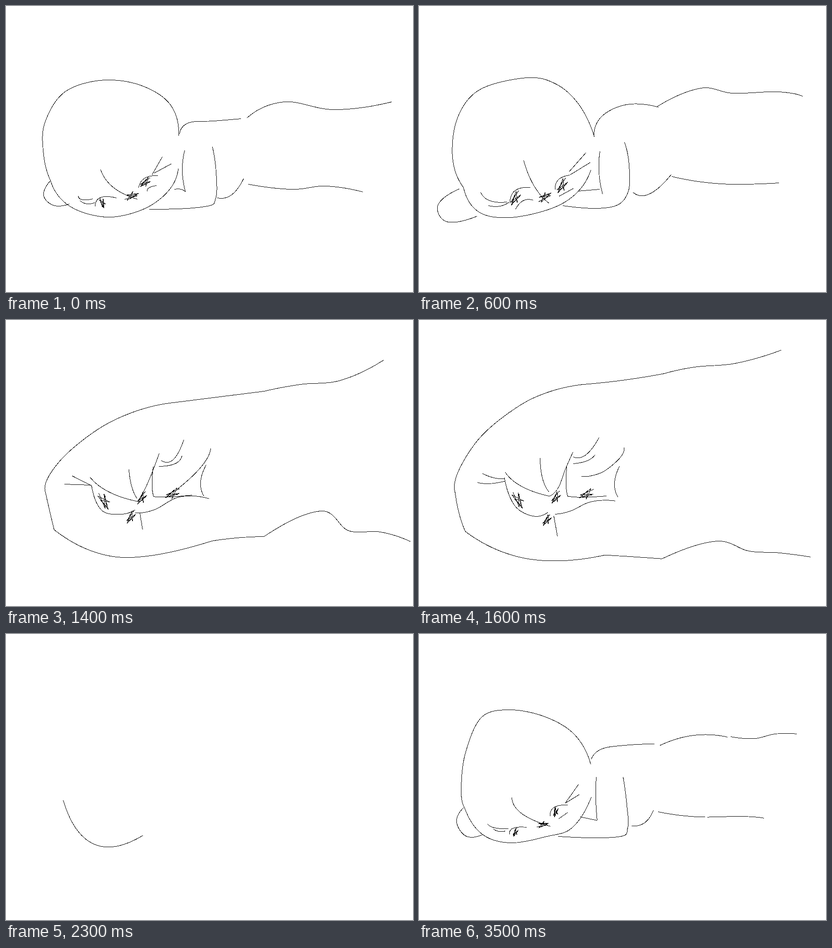
An HTML page that plays this animation: 892x628 px, repeating every 3.6 s.

```html
<!DOCTYPE html>
<html lang="en">
<head>
<meta charset="utf-8">
<title>Line drawing</title>
<style>
html, body { margin: 0; width: 100%; height: 100%; overflow: hidden; background: #fff; }
svg { display: block; }
path { fill: none; stroke: #000; stroke-width: 1; shape-rendering: crispEdges; }
</style>
</head>
<body>
<svg width="892" height="628" viewBox="0 0 892 628"><path id="ink"/></svg>
<script>
const STEP = 100, STEPS = 36, SAMPLES = 64;

// Each pose holds named strokes: a few points on a curve, or the axis of a scribble.
const resting = {
  head: '378 285 358 214 290 172 205 163 126 190 84 258 82 326 97 383',
  chin: '97 383 139 439 220 463 300 446 355 406 377 357',
  shoulder: '380 281 400 256 455 252 515 247',
  back: '528 245 610 210 718 227 845 210',
  hand: '97 383 82 415 103 437 139 434',
  armIn: '391 317 386 362 393 408',
  wrist: '393 408 383 402 369 402',
  armOut: '452 309 460 365 459 422 435 440 313 446',
  waist: '463 421 494 414 520 379',
  belly: '531 391 627 402 700 395 782 408',
  nose: '207 359 235 398 288 424',
  browR: '342 331 319 371',
  foldR: '362 346 325 366',
  browL: '158 417 167 425 190 423',
  foldL: '162 427 177 434 195 431',
  lidL: '195 439 207 420 242 421',
  lidR: '290 399 303 378 332 372',
  lowR: '309 406 314 398 330 394',
  irisL: '206 421 216 443',
  irisR: '316 376 295 398',
  tip: '260 424 289 409'
};

const lifting = {
  head: '384 287 350 216 300 171 236 157 133 183 84 245 73 332 97 398',
  chin: '97 398 131 452 200 464 290 444 345 410 376 360',
  shoulder: '383 287 400 242 455 216 525 222',
  back: '522 220 617 180 687 191 785 188 841 198',
  hand: '88 401 41 437 60 473 127 461',
  armIn: '396 319 394 365 402 413',
  wrist: '396 402 348 406',
  armOut: '450 299 460 350 457 410 420 441 315 438',
  waist: '469 409 505 412 552 370',
  belly: '554 374 620 386 690 391 789 388',
  nose: '229 339 252 395 285 433',
  browR: '365 322 328 364',
  foldR: '375 343 331 370',
  browL: '135 409 155 427 193 430',
  foldL: '152 438 177 439 197 430',
  lidL: '199 432 210 405 244 398',
  lidR: '298 403 305 381 330 371',
  lowL: '211 446 228 427 250 426',
  lowR: '307 417 338 400',
  irisL: '218 405 204 438',
  irisR: '321 377 306 411',
  tip: '262 429 288 408'
};

const merging = {
  head: '353 235 290 202 216 181 141 216 96 306 85 388',
  shoulder: '353 235 395 232 455 201 580 188',
  back: '580 188 770 179 844 182',
  hand: '85 388 64 455 97 488 165 463',
  chin: '165 463 265 467 345 452 430 426',
  waist: '430 426 503 413 575 396',
  belly: '575 396 660 398 755 379 800 400 879 398',
  cheek: '114 430 130 453 165 463',
  nose: '250 333 257 392 288 430',
  browR: '378 305 356 335 325 350',
  foldR: '371 338 352 345 329 347',
  browL: '144 366 165 379 192 387',
  foldL: '139 391 192 390',
  lidL: '190 380 223 397 258 403',
  lowL: '193 396 208 425 247 417',
  lidR: '325 336 300 376 302 409',
  lowR: '304 421 318 401 348 391',
  lip: '411 329 363 406',
  crease: '404 323 404 362 415 381',
  jaw: '373 411 380 394 422 386',
  irisL: '200 408 229 400',
  irisR: '308 370 300 402',
  irisLip: '390 369 377 392',
  tip: '262 431 280 406'
};

const stretching = {
  head: '350 183 275 203 205 237 134 292 93 343 86 378',
  shoulder: '350 183 565 156',
  back: '565 156 645 141 733 132 828 87',
  hand: '86 378 95 418 105 460',
  chin: '105 460 200 511 300 519 450 485',
  waist: '450 485 505 478 565 475',
  belly: '565 475 690 419 750 462 820 465 886 486',
  nose: '269 328 275 365 287 392',
  browR: '389 263 366 306 340 308',
  foldR: '385 298 370 315 334 321',
  browL: '145 342 186 363',
  foldL: '127 360 186 362',
  lidL: '184 345 225 377 288 398',
  lidR: '335 293 309 360 288 398',
  lowL: '187 363 209 417 250 426 283 416',
  lowR: '283 423 325 416 380 388 445 392',
  lip: '448 282 428 321 375 371',
  crease: '438 318 426 355 433 386',
  jaw: '322 322 321 378 335 388 408 384',
  irisL: '203 380 226 414',
  irisR: '305 376 290 405',
  irisLip: '380 370 350 392',
  tip: '280 418 267 447',
  groove: '293 424 299 460'
};

const looming = {
  head: '372 77 298 95 235 128 141 203 74 309 62 380',
  shoulder: '372 77 435 69 500 55',
  back: '500 55 545 47 640 44 741 37',
  hand: '62 380 70 433 91 470',
  chin: '91 470 172 517 265 546 342 557',
  waist: '342 557 410 575 484 593',
  belly: '484 593 590 589 680 580 740 583 815 569',
  nose: '257 270 258 325 274 358',
  browR: '404 246 363 278 333 288',
  foldR: '385 288 340 306',
  browL: '124 332 155 341 184 332',
  foldL: '124 354 148 360 187 346',
  lidL: '191 323 220 354 275 373',
  lidR: '340 284 321 310 304 358 275 373',
  lowL: '181 325 202 396 238 441 273 436',
  lowR: '314 433 350 418 400 398',
  lip: '452 270 435 300 370 341 330 334 323 299',
  groove: '292 441 306 498',
  tip: '292 442 279 464',
  tipLow: '307 453 330 464'
};

const emptying = {
  chin: '95 476 220 538 344 568',
  waist: '344 568 486 602',
  belly: '486 602 680 588 812 577',
  lidL: '176 322 215 360 280 378',
  lowL: '165 335 206 440 282 452'
};
const mouth = { lowL: '105 378 190 474 312 440' };
const smile = { lowL: '124 423 185 456 272 452' };

const settling = {
  head: '376 286 340 220 275 181 197 166 136 183 101 262 92 340 99 380',
  chin: '99 380 138 439 200 458 280 444 335 425 377 358',
  shoulder: '377 275 400 252 450 244 515 241',
  back: '528 244 602 222 676 226',
  leg: '683 225 735 229 780 219 828 219',
  hand: '98 380 82 412 102 443 139 440',
  armIn: '388 314 387 360 390 409',
  wrist: '390 409 353 401',
  armOut: '447 314 455 375 457 425 435 445 305 444',
  waist: '466 421 494 414 513 387',
  belly: '524 390 610 401 705 400 756 404',
  nose: '203 359 225 394 288 422',
  browR: '349 330 320 371',
  foldR: '351 352 320 371',
  browL: '150 417 165 425 195 427',
  foldL: '163 428 175 433 189 432',
  lidL: '198 440 206 426 236 424',
  lidR: '287 399 296 380 326 375',
  lowR: '306 405 326 391',
  irisL: '214 425 208 445',
  irisR: '300 378 298 402',
  tip: '258 423 283 413'
};

const spread = f => Array.from({ length: SAMPLES + 1 }, (_, s) => f(s / SAMPLES));

// A smooth line through the points, its ends bent like a parabola.
function curve(pts) {
  const last = pts.length - 1;
  const beyond = (a, b, c) => a.map((v, k) => c ? 3 * v - 3 * b[k] + c[k] : 2 * v - b[k]);
  const all = [
    beyond(pts[0], pts[1], pts[2]), ...pts,
    beyond(pts[last], pts[last - 1], pts[last - 2])
  ];
  return spread(u => {
    const i = Math.min(last - 1, Math.floor(u * last)), t = u * last - i;
    return [0, 1].map(k => {
      const [a, b, c, d] = all.slice(i, i + 4).map(p => p[k]);
      return b + t / 2 * (c - a + t * (2 * a - 5 * b + 4 * c - d + t * (3 * (b - c) + d - a)));
    });
  });
}

// Pen strokes back and forth along an axis.
function scribble([[x, y], [ex, ey]]) {
  const dx = ex - x, dy = ey - y;
  const turns = Array.from({ length: 9 }, (_, i) => {
    const along = i % 2 ? 1 - i % 3 * 0.14 : i % 5 * 0.09;
    const side = 0.22 * Math.sin(i * 2.2);
    return [x + dx * along - dy * side, y + dy * along + dx * side];
  });
  return spread(u => turns[Math.round(u * 8)]);
}

function trace(pose) {
  return Object.fromEntries(Object.entries(pose).map(([name, text]) => {
    const pts = text.match(/\d+ \d+/g).map(p => p.split(' ').map(Number));
    return [name, /^(iris|tip)/.test(name) ? scribble(pts) : curve(pts)];
  }));
}

const keys = [
  [0, resting], [6, lifting], [10, merging], [14, stretching], [19, looming],
  [21, emptying], [24, mouth], [29, smile], [31, settling], [35, settling]
].map(([step, pose]) => [step, trace(pose)]);
const steady = [0, 6, 10, 14, 19, 29, 35];

// Redrawn lines drift a little between the main poses.
const drift = ([x, y], step) => [
  x + 2.5 * Math.sin(y / 70 + step * 2.1),
  y + 2.5 * Math.sin(x / 80 + step * 1.7)
];

function drawing(step) {
  const i = Math.min(keys.length - 2, keys.findLastIndex(k => k[0] <= step));
  const [from, a] = keys[i], [to, b] = keys[i + 1];
  const t = (step - from) / (to - from);
  return Object.keys({ ...a, ...b }).map(name => {
    let line = t <= 0.5 ? a[name] : b[name];
    if (!line) return '';
    if (a[name] && b[name])
      line = a[name].map((p, s) => p.map((v, k) => v + (b[name][s][k] - v) * t));
    if (!steady.includes(step)) line = line.map(p => drift(p, step));
    return 'M' + line.map(p => p.map(v => (v + 0.5).toFixed(1))).join('L');
  }).join('');
}

const drawings = Array.from({ length: STEPS }, (_, step) => drawing(step));
const ink = document.getElementById('ink');
let shown = -1;

function play() {
  const step = Math.floor(performance.now() / STEP) % STEPS;
  if (step !== shown) ink.setAttribute('d', drawings[shown = step]);
  requestAnimationFrame(play);
}
play();
</script>
</body>
</html>
```
